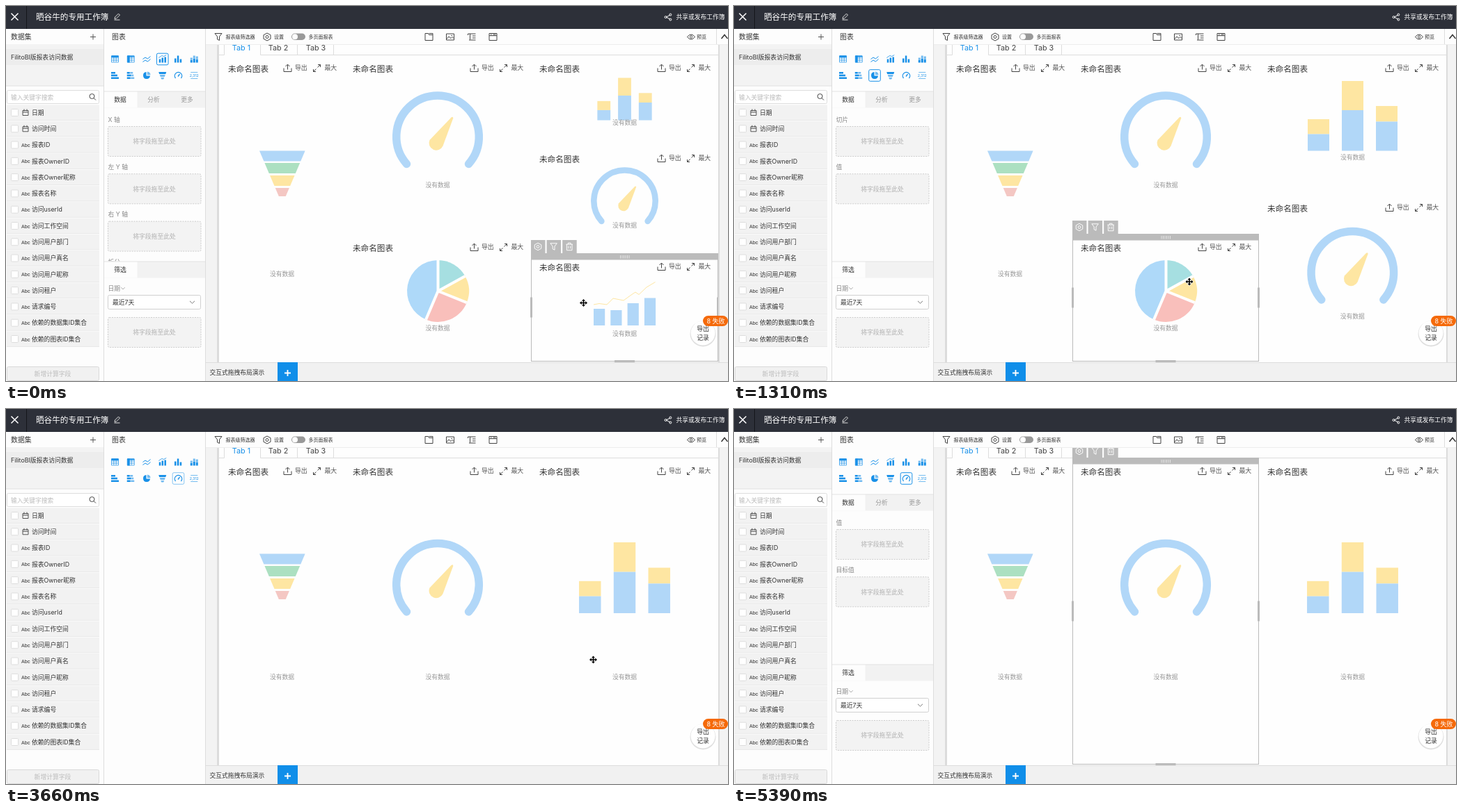
An HTML page that plays this animation: 1037 by 540 pixels, repeating every 5.69 s.

```html
<!DOCTYPE html>
<html lang="zh-CN">
<head>
<meta charset="utf-8">
<title>交互式拖拽布局演示</title>
<style>
  html, body { margin: 0; width: 100%; height: 100%; overflow: hidden; background: #fff; }
  svg { display: block; width: 100vw; height: 100vh; font-family: Inter, "Noto Sans CJK SC", "Noto Sans CJK", sans-serif; }
  .kind { font: 500 7.2px Roboto, sans-serif; }
</style>
</head>
<body>
<svg viewBox="0 0 1037 540">
  <clipPath id="page"><rect x="306" y="56" width="717" height="457"/></clipPath>
  <g id="frame"></g>
  <g id="config"></g>
  <g id="board" clip-path="url(#page)"></g>
  <g id="floating"></g>
  <g id="pointer"></g>
</svg>
<script>
const BLUE = '#b1d7f8', YELLOW = '#fee6a2', GREEN = '#ace0c1', PINK = '#f4c7c3', ACCENT = '#1890e8', GRAY = '#bbb';
const range = n => [...Array(n).keys()];
const $ = id => document.getElementById(id);

// SVG building blocks
const rect = (x, y, w, h, fill, extra = '') =>
  `<rect x="${x}" y="${y}" width="${w}" height="${h}" fill="${fill}" ${extra}/>`;
const box = (x, y, w, h, fill, stroke, extra = '') =>
  rect(x + .5, y + .5, w - 1, h - 1, fill, `stroke="${stroke}" ${extra}`);
const path = (d, fill, extra = '') => `<path d="${d}" fill="${fill}" ${extra}/>`;
const line = (d, color, width = 1) => path(d, 'none', `stroke="${color}" stroke-width="${width}"`);
const at = (x, y, body, scale = 1) => `<g transform="translate(${x} ${y}) scale(${scale})">${body}</g>`;
const text = (x, y, s, size = 8.8, fill = '#333', anchor = 'start') =>
  `<text x="${x}" y="${y + size * .37}" font-size="${size}" fill="${fill}" text-anchor="${anchor}">${s}</text>`;
const centered = (x, y, s, fill = '#333', size = 8.8) => text(x, y, s, size, fill, 'middle');
const icon = (x, y, d, color = '#444', scale = 1, width = 1) => at(x, y, line(d, color, width), scale);

const GLYPH = {
  gear: 'M0-5.5 5-2.8V2.8L0 5.5-5 2.8V-2.8ZM-2 0a2 2 0 1 0 4 0a2 2 0 1 0-4 0',
  filter: 'M-5-5H5L1.5-.5V5L-1.5 3.5V-.5Z',
  trash: 'M-5-3.5H5M-2-3.5V-5.5H2V-3.5M-4-3.5V5.5H4V-3.5M-1.5-1V3M1.5-1V3',
  upload: 'M-5.5 0V5H5.5V0M0 2V-5M-3-2.5 0-5.5 3-2.5',
  expand: 'M1-1 5-5M1.5-5H5V-1.5M-1 1-5 5M-5 1.5V5H-1.5',
  calendar: 'M-4-3H4V4H-4ZM-4-.5H4M-2-5V-2M2-5V-2',
  search: 'M-4-1a3.5 3.5 0 1 0 7 0a3.5 3.5 0 1 0-7 0M2 1.5 5 4.5',
  pencil: 'M-3.5 3-3 .5 2-4.5 4-2.5-1 2.5ZM-4 4.5H4',
  share: 'M3-3-3 0 3 3M1.8-3.5a1.5 1.5 0 1 0 3 0a1.5 1.5 0 1 0-3 0M1.8 3.5a1.5 1.5 0 1 0 3 0a1.5 1.5 0 1 0-3 0M-5 0a1.5 1.5 0 1 0 3 0a1.5 1.5 0 1 0-3 0',
  folder: 'M-5.5-5H-1L0-3H5.5V5H-5.5ZM0-5H5.5V-3',
  image: 'M-5.5-4.5H5.5V4.5H-5.5ZM-5 3-2-.5 1 2 3 0 5 2M1.5-2H3',
  type: 'M-5.5-4.5H5.5M-5.5-4.5V-2.5M-2.5-4.5V4M-4 4.5H5.5M1-1.5H5.5M1 1.5H5.5',
  panel: 'M-5.5-5H5.5V5H-5.5ZM-5.5-1.8H5.5M-3.5-3.4H-2M0-3.4H4',
  eye: 'M-5.5 0Q0-7 5.5 0Q0 7-5.5 0ZM-1.7 0a1.7 1.7 0 1 0 3.4 0a1.7 1.7 0 1 0-3.4 0',
  down: 'M-3.5-1.7 0 1.7 3.5-1.7',
};

// Chart type picker
const bars = list => list.map(([x, y, w, h, o = 1]) => rect(x, y, w, h, ACCENT, `opacity="${o}"`)).join('');
const table = side => line('M-5-4.5H5V4.5H-5ZM-5 1.5H5M-5-1.5H5' + (side ? 'M1-4V4' : 'M-1.7-4V4M1.7-4V4'), ACCENT, .7)
  + bars([side ? [-5, -5, 3.5, 10] : [-5, -5, 10, 2.5], [-5, -5, 10, 2]]);
const TYPES = [
  table(false), table(true),
  line('M-5.5 0-2-2.5 1.5-.5 5.5-4M-5.5 4-2 1.5 1.5 3.5 5.5 0', ACCENT),
  bars([[-5, 0, 2.5, 5], [-1.2, -2, 2.5, 7], [2.7, -3, 2.5, 8]]) + line('M-5.5-2-1-5 2-4 5.5-6', ACCENT, .8),
  bars([[-5.5, -1, 2.5, 6], [-1.7, -5, 2.5, 10], [2.2, 0, 2.5, 5]]),
  bars([[-5.5, 1, 3, 4], [-1.5, -1, 3, 6], [2.5, 0, 3, 5], [-5.5, -2, 3, 2.5, .6], [-1.5, -5, 3, 3.5, .6], [2.5, -4, 3, 3.5, .6]]),
  bars([[-5.5, -5, 6, 2.5], [-5.5, -1.3, 9, 2.5], [-5.5, 2.5, 11, 2.5]]),
  bars([[-5.5, -5, 4, 2.5], [-5.5, -1.3, 6, 2.5], [-5.5, 2.5, 5, 2.5], [-1, -5, 4, 2.5, .6], [1, -1.3, 3, 2.5, .6], [0, 2.5, 5, 2.5, .6]]),
  path('M-.5-5A5 5 0 1 0 5 .5H-.5Z', ACCENT) + path('M.8-5.5A5 5 0 0 1 5.5-.8H.8Z', ACCENT, 'opacity=".6"'),
  path('M-5.5-5H5.5L4.6-2H-4.6Z', ACCENT) + path('M-4-1H4L3 2H-3ZM-2.5 3H2.5L1.5 5.5H-1.5Z', ACCENT, 'opacity=".6"'),
  line('M-4 4A5.2 5.2 0 1 1 4 4M-.5 1.5 2-2', ACCENT, 1.3),
  centered(0, 0, '2,312', ACCENT, 5.2) + line('M-5-4.5H5M-5 4.5H5', ACCENT, .6),
];
const TYPE_INDEX = { combo: 3, pie: 8, gauge: 10 };
const typePosition = i => [156.5 + 22.75 * (i % 6), i < 6 ? 76.5 : 100];

// Charts on the board
const noData = (x, y) => centered(x, y, '没有数据', '#999');

function funnel() {
  const half = y => 32.8 - .425 * (y - 208.5);
  const layers = [[208.5, 223.5, BLUE], [226, 241, GREEN], [244, 259, YELLOW], [262, 274, PINK]];
  return layers.map(([a, b, color]) =>
    path(`M${396.8 - half(a)} ${a}H${396.8 + half(a)}L${396.8 + half(b)} ${b}H${396.8 - half(b)}Z`, color)).join('') + noData(396.5, 386);
}

const gauge = (x, y, captionY, scale = 1) => at(x, y,
  path('M-44.5 39.5A59.3 59.3 0 1 1 44.5 39.5', 'none', `stroke="${BLUE}" stroke-width="11.5" stroke-linecap="round"`)
  + path('M19.5-27.5Q22-29.5 22.3-26.5L7.5 13.5A10.4 10.4 0 0 1-11.5 5Z', YELLOW), scale) + noData(x, captionY);

function stackedBars(base, captionY, scale) {
  const stacks = [[45.5, 24], [100.5, 58.5], [64.5, 42]];
  return at(888.5, base, stacks.map(([total, lower], i) => {
    const x = -15.5 + 49 * (i - 1);
    return rect(x, -total, 31, total - lower, YELLOW) + rect(x, -lower, 31, lower, BLUE);
  }).join(''), scale) + noData(888.5, captionY);
}

function pie() {
  const R = 44.5, stops = [0, 61, 112, 203, 360], colors = ['#a6dfe1', YELLOW, '#f9bfbb', '#aed9f9'];
  const rim = deg => {
    const a = deg * Math.PI / 180;
    return `${R * Math.sin(a)} ${-R * Math.cos(a)}`;
  };
  const slices = colors.map((color, i) =>
    path(`M0 0L${rim(stops[i])}A${R} ${R} 0 0 1 ${rim(stops[i + 1])}Z`, color)).join('');
  const gaps = line(stops.slice(0, 4).map(s => `M0 0L${rim(s)}`).join(''), '#fff', 4);
  return at(620.5, 410.5, slices + gaps) + noData(620, 464);
}

const combo = () => [24, 22, 32, 39.5].map((h, i) => rect(844 + 24.3 * i, 460 - h, 16.2, h, BLUE)).join('')
  + line('M844 430 852 428.5 863 430 872 421 887 424 898 416 904 412 909 415.5 920 405 932.5 397.5', YELLOW)
  + noData(888.5, 472);

const LEFT = [306, 486], MIDDLE = [486, 754], RIGHT = [754, 1023];
const cell = (col, top, bottom, art) => ({ col, top, bottom, art });
const funnelCell = cell(LEFT, 70, 512, funnel());
const pieCell = cell(MIDDLE, 328, 512, pie());
const shortGauge = cell(MIDDLE, 70, 328, gauge(620, 188, 257.5));
const tallGauge = cell(MIDDLE, 70, 512, gauge(620, 252.5, 386));
const halfBars = cell(RIGHT, 70, 271, stackedBars(208.5, 217.5, 1));
const halfGauge = cell(RIGHT, 271, 512, gauge(888.3, 383.5, 446.5));
const LAYOUTS = {
  six: {
    funnel: funnelCell, gauge: shortGauge, pie: pieCell,
    bars: cell(RIGHT, 70, 200, stackedBars(164.5, 168, .607)),
    sideGauge: cell(RIGHT, 200, 356, gauge(888.5, 280.5, 316, .745)),
    combo: cell(RIGHT, 356, 512, combo()),
  },
  five: { funnel: funnelCell, gauge: shortGauge, pie: pieCell, bars: halfBars, sideGauge: halfGauge },
  four: { funnel: funnelCell, gauge: tallGauge, bars: halfBars, sideGauge: halfGauge },
  three: { funnel: funnelCell, gauge: tallGauge, bars: cell(RIGHT, 70, 512, stackedBars(294, 386, 1.015)) },
};

const drawCell = ({ col: [left, right], top, art }) => art
  + text(left + (left === 306 ? 13 : 12), top + 21, '未命名图表', 11.6)
  + icon(right - 81.5, top + 19.5, GLYPH.upload) + text(right - 71, top + 19, '导出', 8.9, '#555')
  + icon(right - 39.5, top + 19.5, GLYPH.expand) + text(right - 28.5, top + 19, '最大', 8.9, '#555');

const drawHover = ({ col: [l, r], top, bottom }) =>
  box(l, top + .5, r - l, bottom - top, 'none', GRAY, 'stroke-dasharray="2 1.5"');

function drawSelection({ col: [l, r], top, bottom }) {
  const cx = (l + r) / 2, cy = (top + bottom) / 2;
  const buttons = [GLYPH.gear, GLYPH.filter, GLYPH.trash].map((d, i) =>
    rect(l + 22.6 * i, top - 19, 20.5, 19.5, GRAY) + icon(l + 10 + 22.6 * i, top - 9.5, d, '#fff', .95)).join('');
  const grip = range(6).map(i => `M${cx - 6 + 2.5 * i} ${top + 3}v4.5`).join('');
  return box(l, top, r - l, bottom - top, 'none', GRAY) + rect(l, top + .5, r - l, 9, GRAY) + buttons + line(grip, '#eee', .8)
    + rect(l - 1, cy - 14.5, 3, 29, GRAY) + rect(r - 2, cy - 14.5, 3, 29, GRAY) + rect(cx - 14.5, bottom - 2, 29, 3, GRAY);
}

// Settings column of the selected chart
const dropZone = y => box(146, y, 134.5, 44, '#f3f3f3', '#ccc', 'rx="2" stroke-dasharray="2 1.5"')
  + centered(213, y + 22, '将字段拖至此处', '#b0b0b0');
const SLOTS = {
  combo: ['X 轴', '左 Y 轴', '右 Y 轴', '拆分'],
  pie: ['切片', '值'],
  gauge: ['值', '目标值'],
};
const tabStrip = y => rect(141, y, 145, 23.5, '#f2f2f2') + rect(141, y, 47.5, 23.5, '#fdfdfd') + line(`M141 ${y}H286`, '#e3e3e3');
const drawConfig = type => tabStrip(123) + centered(164, 135, '数据') + centered(212, 135, '分析', '#999') + centered(260, 135, '更多', '#999')
  + SLOTS[type].map((label, i) => text(146.5, 163.5 + 68.3 * i, label, 8.8, '#888') + dropZone(173 + 68.3 * i)).join('')
  + rect(141, 367.5, 145, 172.5, '#fdfdfd') + tabStrip(368) + centered(164, 380, '筛选')
  + text(146.5, 407, '日期', 8.8, '#888') + icon(168, 406.5, GLYPH.down, '#999', .8)
  + box(146, 416, 134, 21, '#fff', '#d0d0d0', 'rx="2"') + text(153, 426.5, '最近7天') + icon(267.5, 426.5, GLYPH.down, '#777')
  + dropZone(448);

function drawTypeMark(type, opacity) {
  const [x, y] = typePosition(TYPE_INDEX[type]);
  return box(x - 8.8, y - 8.8, 17.6, 17.6, 'none', ACCENT, `rx="2" opacity="${opacity}"`);
}

const MOVE = 'M0-5.5 2.5-2.8H.8V-.8H2.8V-2.5L5.5 0 2.8 2.5V.8H.8V2.8H2.5L0 5.5-2.5 2.8H-.8V.8H-2.8V2.5L-5.5 0-2.8-2.5V-.8H-.8V-2.8H-2.5Z';
const drawPointer = ([x, y]) => at(x, y, path(MOVE, '#000', 'stroke="#fff" stroke-width="1.2" paint-order="stroke"'));

// Fixed surroundings
function drawFrame() {
  const fields = ['日期', '访问时间', '报表ID', '报表OwnerID', '报表Owner昵称', '报表名称', '访问userId', '访问工作空间', '访问用户部门',
    '访问用户真名', '访问用户昵称', '访问租户', '请求编号', '依赖的数据集ID集合', '依赖的图表ID集合'];
  const header = rect(0, 0, 1037, 33, '#2d3039') + rect(29, 0, 1, 33, '#14161b')
    + line('M7.5 10.5 17.5 20.5M17.5 10.5 7.5 20.5', '#fff', 1.5)
    + text(43, 16, '晒谷牛的专用工作簿', 11.6, '#fff') + icon(159.5, 15.5, GLYPH.pencil, '#ddd')
    + icon(951, 16, GLYPH.share, '#fff') + text(962.5, 16, '共享或发布工作簿', 8.75, '#fff');
  const dataPanel = rect(0, 33, 140, 507, '#fdfdfd') + rect(0, 55, 140, 59.5, '#f3f3f3') + rect(0, 62, 140, 23, '#ededed')
    + line('M0 115H140', '#ddd') + text(7, 44.5, '数据集', 9.9) + line('M121 44.5H129M125 40.5V48.5', '#555')
    + text(7, 73.5, 'FilitoBI版报表访问数据')
    + box(1, 121, 133, 20, '#fff', '#ddd', 'rx="2"') + text(7, 131.5, '输入关键字搜索', 8.75, '#bbb') + icon(124, 131, GLYPH.search)
    + fields.map((name, i) => {
      const y = 153.5 + 23.286 * i;
      const kind = i < 2 ? icon(28, y, GLYPH.calendar, '#555') : `<text class="kind" x="22" y="${y + 3}" fill="#555">Abc</text>`;
      return rect(1, y - 11, 133, 22, '#f2f2f2') + line(`M1 ${y + 11}H134`, '#e8e8e8') + box(7, y - 5.5, 11, 11, '#fff', '#ddd', 'rx="1"')
        + kind + text(37, y, name);
    }).join('')
    + box(1, 519, 133, 21, '#f1f1f1', '#d9d9d9', 'rx="2"') + centered(67, 530, '新增计算字段', GRAY);
  const typePanel = rect(140, 33, 146.5, 507, '#fdfdfd') + line('M140.5 33V540M286.5 33V540', '#ddd') + text(152, 44.5, '图表', 9.9)
    + TYPES.map((art, i) => at(...typePosition(i), art)).join('');
  const toolbar = rect(287, 33, 750, 22.5, '#fdfdfd')
    + icon(305, 44.5, GLYPH.filter) + text(315.5, 44.5, '报表级筛选器', 7)
    + icon(375, 44.5, GLYPH.gear) + text(385, 44.5, '设置', 7)
    + rect(410, 39.5, 20, 9.5, '#999', 'rx="4.75"') + '<circle cx="415" cy="44.25" r="4" fill="#fff"/>' + text(434.5, 44.5, '多页面报表', 7)
    + icon(607.5, 44.5, GLYPH.folder) + icon(638, 44.5, GLYPH.image) + icon(669, 44.5, GLYPH.type) + icon(699.5, 44.5, GLYPH.panel)
    + icon(984, 44.5, GLYPH.eye) + text(992, 44.5, '预览', 7)
    + line('M1020.5 33V55', '#ddd') + line('M1027.5 47 1032 41.5 1036.5 47', '#333', 1.5);
  const page = rect(287, 55.5, 750, 458, '#f3f3f3') + rect(303, 56, 3, 457, '#dcdcdc') + rect(306, 56, 717, 457, '#fefefe')
    + rect(1023, 56, 2, 457, '#dcdcdc') + line('M287 55.5H1037', '#ddd')
    + line('M306 70.5H313.5V56M365.5 56V70.5H1023M418.5 56V70M470.5 56V70', '#ddd')
    + [338, 391, 445].map((x, i) => centered(x, 60, `Tab ${i + 1}`, i ? '#444' : ACCENT, 10.8)).join('');
  const footer = rect(287, 513, 750, 27, '#f1f1f1') + line('M287 513.5H1037', '#ddd') + text(292.5, 528, '交互式拖拽布局演示', 8.75)
    + rect(390, 513, 29, 27, '#108ee9') + line('M400 528.5H409M404.5 524V533', '#fff', 1.8);
  return dataPanel + typePanel + page + toolbar + footer + header;
}

const drawFloating = () => '<circle cx="1001" cy="472" r="18.5" fill="#000" opacity=".12"/><circle cx="1001" cy="471" r="17.5" fill="#fff"/>'
  + centered(1001, 465, '导出') + centered(1001, 477.5, '记录')
  + rect(1001, 446, 36, 15, '#f56a0a', 'rx="7.5"') + centered(1019.5, 453.5, '8 失败', '#fff', 9);

// Each step overrides part of the state from its time on
const LOOP = 5690;
const STEPS = [
  [0, { layout: 'six', selected: 'combo', type: 'combo', mark: 1, hover: null, pointer: [829.5, 427.5] }],
  [150, { layout: 'five', selected: null }],
  [390, { mark: 0 }],
  [710, { hover: 'sideGauge', pointer: [671.5, 401] }],
  [860, { hover: 'pie', pointer: [654, 397] }],
  [1160, { hover: null, selected: 'pie', type: 'pie', mark: .5 }],
  [1310, { mark: 1 }],
  [1780, { layout: 'four', selected: null, mark: 0 }],
  [2110, { pointer: [688.5, 383.5] }],
  [2250, { hover: 'gauge', pointer: [838.5, 362] }],
  [2400, { hover: 'sideGauge', pointer: [843.5, 361] }],
  [2700, { hover: null, selected: 'sideGauge', type: 'gauge', mark: .5 }],
  [2880, { mark: 1 }],
  [3660, { layout: 'three', selected: null, mark: .5 }],
  [3810, { mark: 0, pointer: [785, 343] }],
  [3980, { hover: 'bars', pointer: [717.5, 322.5] }],
  [4130, { hover: 'gauge' }],
  [4430, { hover: null, selected: 'gauge', mark: .5 }],
  [4580, { mark: 1 }],
  [4910, { pointer: [984.5, 476.5] }],
  [5060, { pointer: [1000.5, 498.5] }],
  [5210, { hover: 'bars' }],
  [5390, { hover: null, pointer: null }],
];

function render(index) {
  const state = Object.assign({}, ...STEPS.slice(0, index + 1).map(step => step[1]));
  const cells = LAYOUTS[state.layout];
  $('config').innerHTML = (state.selected ? drawConfig(state.type) : '') + drawTypeMark(state.type, state.mark);
  $('board').innerHTML = Object.values(cells).map(drawCell).join('')
    + (state.hover ? drawHover(cells[state.hover]) : '')
    + (state.selected ? drawSelection(cells[state.selected]) : '');
  $('pointer').innerHTML = state.pointer ? drawPointer(state.pointer) : '';
}

$('frame').innerHTML = drawFrame();
$('floating').innerHTML = drawFloating();

let shown = -1, start;
function tick(now) {
  start ??= now;
  const time = (now - start) % LOOP;
  const index = STEPS.findLastIndex(([from]) => from <= time);
  if (index !== shown) render(shown = index);
  requestAnimationFrame(tick);
}
requestAnimationFrame(tick);
</script>
</body>
</html>
```
